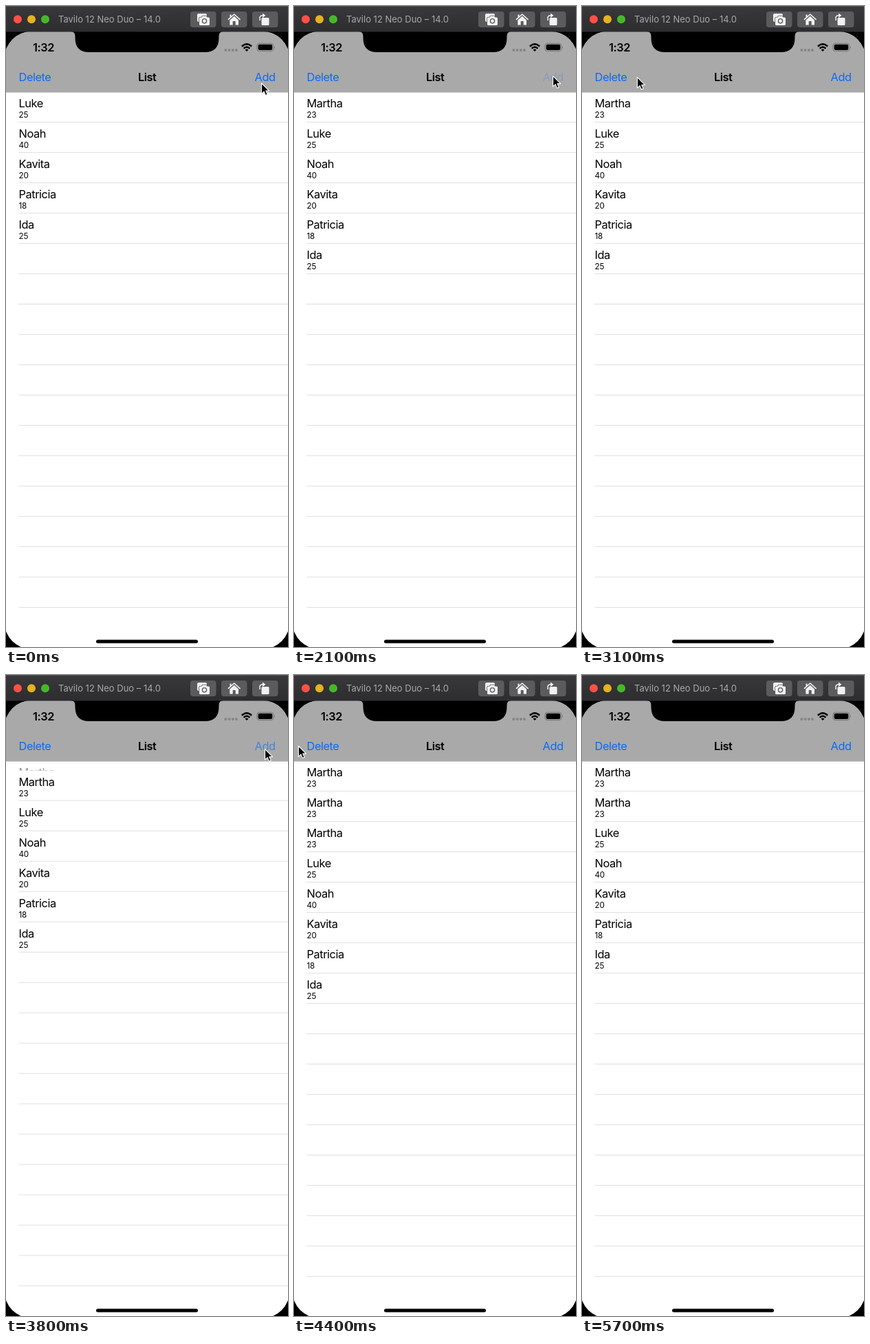
An HTML page that plays this animation: 410 px wide and 930 px high, repeating every 5800 ms.

```html
<!DOCTYPE html>
<html lang="en">
<head>
<meta charset="utf-8">
<title>List</title>
<style>
  html, body { margin: 0; width: 100%; height: 100%; overflow: hidden; background: #000; }
  svg { display: block; width: 410px; height: 930px; }
  text { font-family: Inter, Roboto, sans-serif; white-space: pre; }
  .body { font-size: 16.4px; letter-spacing: -.45px; }
  .sub { font-size: 11.7px; letter-spacing: -.2px; }
  .bold { font-weight: 600; }
  .link { fill: #0a6cf5; }
  .title { font-size: 13px; fill: #a9a8aa; }
</style>
</head>
<body>
<svg viewBox="0 0 410 930">
  <defs>
    <clipPath id="screen"><rect x="-2" y="37" width="414" height="896" rx="39"/></clipPath>
    <linearGradient id="bar" x2="0" y2="1">
      <stop stop-color="#39383a"/><stop offset="1" stop-color="#2d2c2e"/>
    </linearGradient>
    <rect id="button" y="8" width="37.5" height="23" rx="4" fill="#5b5a5c"/>
    <circle id="light" cy="19.2" r="6"/>
    <circle id="dot" cy="64" r="2" fill="#858585"/>
  </defs>

  <rect width="410" height="930"/>

  <g clip-path="url(#screen)">
    <rect y="37" width="410" height="893" fill="#fff"/>
    <g id="ghost" transform="translate(0 125)"></g>
    <g id="list"><rect width="410" height="805" fill="#fff"/></g>
    <rect y="37" width="410" height="88.5" fill="#a9a9a9"/>
    <rect x="131" y="919.6" width="148" height="5" rx="2.5"/>
  </g>

  <!-- notch -->
  <path d="M94 36V37Q100.5 37 100.5 44V46C100.5 60 107 67 121 67H289C303 67 309.5 60 309.5 46V44Q309.5 37 316 37V36Z"/>

  <!-- status bar -->
  <text class="body bold" x="39" y="66">1:32</text>
  <use href="#dot" x="319.3"/><use href="#dot" x="324.6"/>
  <use href="#dot" x="329.8"/><use href="#dot" x="335"/>
  <g fill="none" stroke="#000" stroke-width="2.5">
    <path d="M342.8 58.6Q350 51.8 357.2 58.6"/>
    <path d="M345.6 61.6Q350 57.4 354.4 61.6"/>
  </g>
  <path d="M347.6 63.4Q350 61.4 352.4 63.4L350 66Z"/>
  <rect x="365" y="54.2" width="23.8" height="11.4" rx="3.4" fill="none" stroke="#747474"/>
  <rect x="366.6" y="55.8" width="20.6" height="8.2" rx="2"/>
  <path d="M390 58Q391.8 59.8 390 61.8Z" fill="#747474"/>

  <!-- navigation -->
  <text class="body link" id="del" x="18.5" y="109">Delete</text>
  <text class="body bold" x="205.2" y="109" text-anchor="middle">List</text>
  <text class="body link" id="add" x="391.6" y="109" text-anchor="end">Add</text>

  <!-- window bar -->
  <rect width="410" height="37.5" fill="url(#bar)"/>
  <rect width="410" height="1" fill="#555456"/>
  <use href="#light" x="17" fill="#ff5147"/>
  <use href="#light" x="37" fill="#e4b222"/>
  <use href="#light" x="57" fill="#48b72a"/>
  <text class="title" x="76" y="24">Tavilo 12 Neo Duo – 14.0</text>
  <use href="#button" x="268"/><use href="#button" x="313"/><use href="#button" x="358"/>
  <g fill="#f1f1f1">
    <rect x="278" y="11" width="14" height="12" rx="2"/>
    <path d="M281 18Q281 16.5 282.5 16.5H284.5L286 14.5H291L292.5 16.5H294.5Q296 16.5 296 18V26.5Q296 28 294.5 28H282.5Q281 28 281 26.5Z"
          stroke="#5b5a5c" stroke-width="1.6" paint-order="stroke"/>
    <circle cx="288.5" cy="21.8" r="3.1" fill="none" stroke="#5b5a5c" stroke-width="1.3"/>
    <path d="M331.7 11L341 19.3L340 20.4L331.7 13L323.4 20.4L322.4 19.3L325.5 16.5V12.5H327.5V14.7Z"/>
    <path d="M325.3 20.4L331.7 14.7L338 20.4V27.5H333.7V22H329.7V27.5H325.3Z"/>
    <rect x="371.5" y="17" width="11" height="11" rx="1.5"/>
    <path d="M373 10.5L377.5 13.8L373 17Z"/>
    <path d="M369 21V17Q369 13.8 373.5 13.8" fill="none" stroke="#f1f1f1" stroke-width="1.5"/>
  </g>

  <path id="cursor" d="M0 0V15.4L3.6 12.1L6 17.6L8.7 16.4L6.3 11.1H11.1Z"
        stroke="#fff" stroke-width="1.1" stroke-linejoin="round"/>
</svg>

<script>
const LOOP = 5800, STEP = 100, TOP = 125, ROW = 44, SLOTS = 17;
const SLIDE = 100, HOLD = 160, FADE = 60;
const people = [["Luke", 25], ["Noah", 40], ["Kavita", 20], ["Patricia", 18], ["Ida", 25]];
const extra = ["Martha", 23];

// Release time of each tap
const taps = {
  add: [200, 2152, 3769, 4077],
  del: [2859, 4750]
};

// Cursor moves: start, end, x, y
const moves = [
  [0, 100, 375, 104], [300, 600, 311, 121], [600, 800, 317.5, 171],
  [1000, 1800, 376.5, 101.5], [2200, 2500, 66.5, 109.5], [2500, 2700, 46, 103],
  [3000, 3500, 376.5, 107.5], [4150, 4400, 6.5, 103], [4400, 4600, 32, 102],
  [4900, 5100, 44, 4]
];
const home = [371.5, 112], GONE = 5200;

const $ = id => document.getElementById(id);
const clamp = v => Math.min(1, Math.max(0, v));
const smooth = v => v * v * (3 - 2 * v);
const progress = (t, from, length) => clamp((t - from) / length);

function make(tag, attrs) {
  const el = document.createElementNS("http://www.w3.org/2000/svg", tag);
  for (const k in attrs) el.setAttribute(k, attrs[k]);
  return el;
}

function addRow(parent, y) {
  const cells = [["body", 22], ["sub", 37]].map(([cls, dy]) => make("text", { class: cls, x: 18.5, y: y + dy }));
  parent.append(...cells);
  return cells;
}

function fill(cells, person = ["", ""]) {
  cells.forEach((cell, i) => cell.textContent = person[i]);
}

fill(addRow($("ghost"), 0), extra);
const rows = Array.from({ length: SLOTS }, (_, i) => {
  const y = i * ROW;
  $("list").append(make("rect", { x: 18.5, y: y + 43, width: 392, height: 1, fill: "#e0e0e2" }));
  return addRow($("list"), y);
});

let shown = -1;
function setExtras(n) {
  if (n === shown) return;
  shown = n;
  rows.forEach((cells, i) => fill(cells, i < n ? extra : people[i - n]));
}

// Whole extras are settled rows; the fraction is a row sliding open or shut.
function drawList(t) {
  const done = list => list.reduce((sum, at) => sum + progress(t, at, SLIDE), 0);
  const extras = Math.round((done(taps.add) - done(taps.del)) * 1000) / 1000;
  const open = extras % 1;
  setExtras(Math.floor(extras));
  $("list").setAttribute("transform", `translate(0 ${TOP + open * ROW})`);
  $("ghost").setAttribute("opacity", clamp(open * 1.3));
}

function drawLink(id, t) {
  const at = taps[id].find(at => t >= at - HOLD && t < at + FADE);
  $(id).setAttribute("opacity", at ? .2 + .8 * progress(t, at, FADE) : 1);
}

function drawCursor(t) {
  let [x, y] = home;
  for (const [from, to, nx, ny] of moves) {
    const p = smooth(progress(t, from, to - from));
    x += (nx - x) * p;
    y += (ny - y) * p;
  }
  $("cursor").setAttribute("transform", `translate(${x} ${y})`);
  $("cursor").style.visibility = t < GONE ? "visible" : "hidden";
}

const start = performance.now();
function tick() {
  const t = Math.floor((performance.now() - start) % LOOP / STEP) * STEP;
  drawList(t);
  drawLink("add", t);
  drawLink("del", t);
  drawCursor(t);
  requestAnimationFrame(tick);
}
tick();
</script>
</body>
</html>
```
